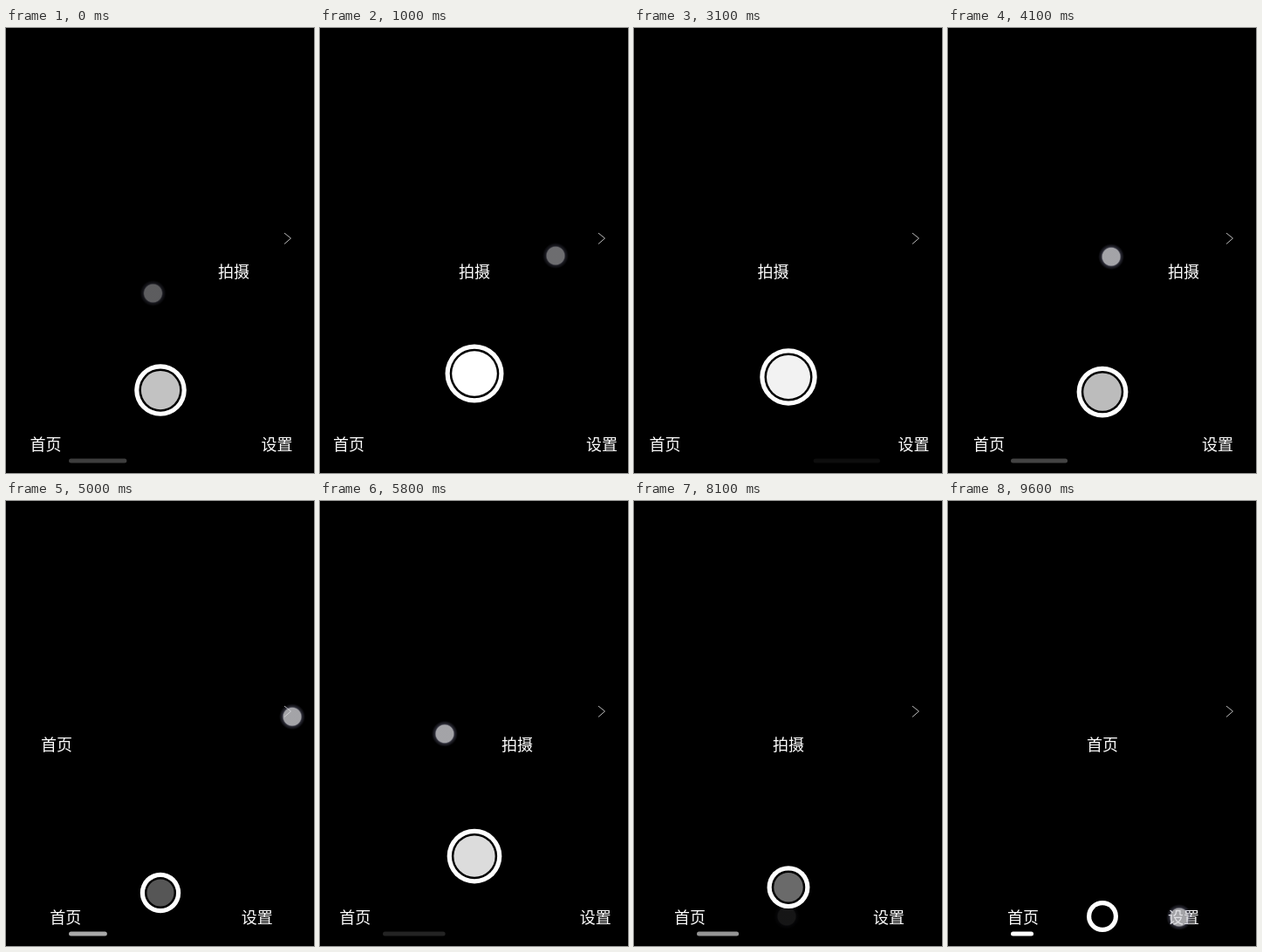
Recreate the animation shown at these times as an HTML page with a canvas. Size 353x510 px, loop 9700 ms.

```html
<!DOCTYPE html>
<html lang="zh-CN">
<head>
<meta charset="utf-8">
<style>
html, body { margin: 0; width: 100%; height: 100%; overflow: hidden; background: #000; }
canvas { display: block; }
</style>
</head>
<body>
<canvas id="stage" width="353" height="510"></canvas>
<script>
const W = 353, H = 510, LOOP = 9700, STEP = 100, MID = 177;
const ctx = document.getElementById('stage').getContext('2d');
const titles = ['首页', '拍摄', '设置'];

const linear = u => u;
const easeIn = u => u * u;
const easeInOut = u => u * u * (3 - 2 * u);
const settle = u => (1 - Math.exp(-4 * u)) / (1 - Math.exp(-4));

// Keys: [time, value, easing of the stretch that ends here]
const pageKeys = [
  [0, .762], [600, 1, settle],
  [1000, 1], [1400, 1.62, easeIn], [2000, 2, settle],
  [2400, 2], [2800, 1.3, easeIn], [3500, 1, settle],
  [3800, 1], [4500, .33, easeInOut], [5000, .337],
  [5900, .88, easeInOut], [6200, .84], [6600, .574, easeIn], [6700, .34],
  [7400, 0, settle],
  [7900, 0], [8000, .55], [8100, 1],
  [8500, 1], [8600, .6], [8700, .1], [8800, 0]
];
const tapKeys = [
  [7860, 0], [8400, 1, easeInOut], [8440, 1], [8940, 0, easeInOut]
];

// Fingers move with the page: [down, up, x, y, page at touch, vertical slope]
const touches = [
  [-500, -100, 168.5, 304, .762, 0],
  [1000, 1400, 270, 261, 1, -.1],
  [2400, 2800, 90, 275, 2, -.148],
  [3800, 6700, 94, 272, 1, -.106],
  [7700, 7900, 175, 476, 0, 0],
  [8200, 8400, 35, 477, 1, 0],
  [9500, 9700, 265, 477, 0, 0]
];

function track(keys, t) {
  const i = keys.findIndex(k => k[0] > t);
  if (i === 0) return keys[0][1];
  if (i < 0) return keys[keys.length - 1][1];
  const [t0, v0] = keys[i - 1], [t1, v1, ease = linear] = keys[i];
  return v0 + (v1 - v0) * ease((t - t0) / (t1 - t0));
}

function label(text, x, y) {
  ctx.fillStyle = '#fff';
  ctx.fillText(text, x, y);
}

function disc(x, y, r, fill) {
  ctx.fillStyle = fill;
  ctx.beginPath();
  ctx.arc(x, y, r, 0, 2 * Math.PI);
  ctx.fill();
}

function chevron() {
  ctx.strokeStyle = '#bbb';
  ctx.lineWidth = 1;
  ctx.beginPath();
  ctx.moveTo(319, 235);
  ctx.lineTo(326.5, 241);
  ctx.lineTo(319, 247.5);
  ctx.stroke();
}

function tabBar(open, rightSide) {
  label(titles[0], 86 - 53 * open, 484);
  label(titles[2], 270 + 53 * open, 484);

  const y = 476 - 80 * open, r = 18 + 15.5 * open;
  disc(MID, y, r, '#fff');
  disc(MID, y, r - 5.2, '#000');
  disc(MID, y, r - 7.7, `rgba(255,255,255,${open})`);

  const width = 26 + 53 * open;
  ctx.fillStyle = `rgba(255,255,255,${1 - open})`;
  ctx.beginPath();
  ctx.roundRect(rightSide ? 282 - width : 72, 493.5, width, 5, 2.5);
  ctx.fill();
}

function finger(t, [down, up, x, y, page, slope]) {
  const alpha = Math.min((t - down + 100) / 150, 1, 1 - (t - up) / 230);
  if (t < down || alpha <= 0) return;
  const dx = W * (page - track(pageKeys, Math.min(t, up)));
  x += dx;
  y += dx * slope;
  const glow = ctx.createRadialGradient(x, y, 0, x, y, 15);
  glow.addColorStop(0, 'rgba(215,215,220,.76)');
  glow.addColorStop(.66, 'rgba(215,215,220,.76)');
  glow.addColorStop(.76, 'rgba(140,140,170,.3)');
  glow.addColorStop(1, 'rgba(120,120,160,0)');
  ctx.globalAlpha = alpha;
  disc(x, y, 15, glow);
  ctx.globalAlpha = 1;
}

function draw(t) {
  const page = track(pageKeys, t);
  const open = t < 7700 ? 1 - Math.abs(page - 1) : track(tapKeys, t);
  ctx.fillStyle = '#000';
  ctx.fillRect(0, 0, W, H);
  ctx.font = '18px "Noto Sans CJK SC", "Noto Sans CJK", sans-serif';
  ctx.textAlign = 'center';
  titles.forEach((text, i) => label(text, MID + (i - page) * W, 285.5));
  chevron();
  tabBar(open, page > 1);
  touches.forEach(touch => finger(t, touch));
}

const start = performance.now();
function frame() {
  const t = (performance.now() - start) % LOOP;
  draw(Math.floor(t / STEP) * STEP);
  requestAnimationFrame(frame);
}
frame();
</script>
</body>
</html>
```
